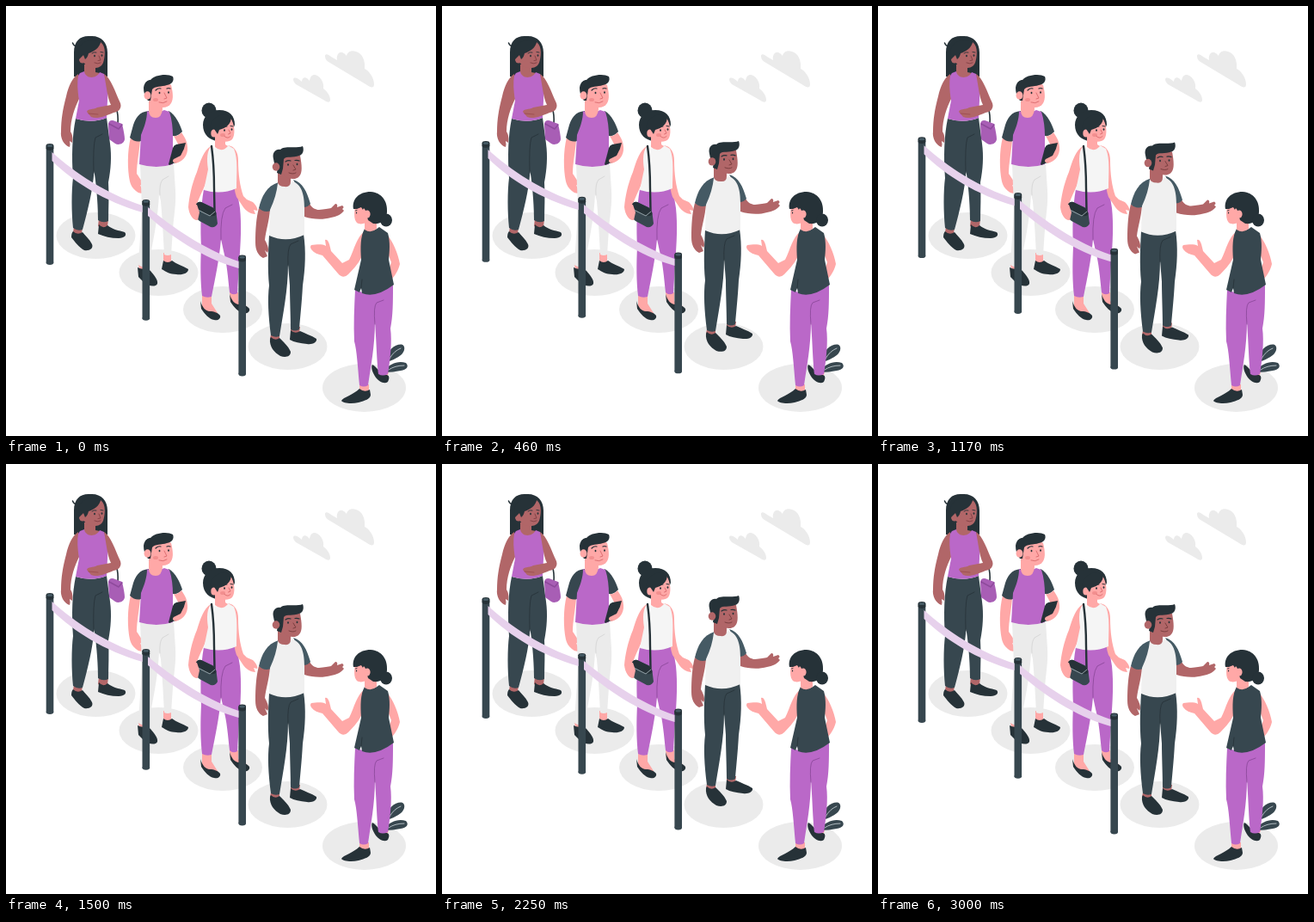
An HTML page with a canvas that plays this animation: 500 by 500 pixels, repeating every 3040 ms.

```html
<!DOCTYPE html>
<html>
<head>
<meta charset="utf-8">
<style>
html, body { margin: 0; width: 100%; height: 100%; overflow: hidden; background: #fff; }
canvas { display: block; width: 500px; height: 500px; }
</style>
</head>
<body>
<canvas id="stage"></canvas>
<script>
const canvas = document.getElementById('stage');
const ctx = canvas.getContext('2d');
const dpr = window.devicePixelRatio || 1;
canvas.width = canvas.height = 500 * dpr;

const INK = '#263238', SLATE = '#37474f', STEEL = '#455a64', PURPLE = '#ba68c8', PLUM = '#8e4a9c';
const PALE = '#ebebeb', SHIRT = '#f0f0f0', TOP = '#f5f5f5', ROPE = '#e7d1ec';
const ROSE = '#ffa8a7', BROWN = '#b16668', BLUSH = '#f28f8f';

const paths = {};
const path = d => paths[d] || (paths[d] = new Path2D(d));

function fill(color, ...shapes) {
  ctx.fillStyle = color;
  shapes.forEach(d => ctx.fill(path(d)));
}
function line(color, width, ...shapes) {
  ctx.strokeStyle = color;
  ctx.lineWidth = width;
  ctx.lineCap = ctx.lineJoin = 'round';
  shapes.forEach(d => ctx.stroke(path(d)));
}
function oval(color, x, y, rx, ry = rx, turn = 0) {
  ctx.fillStyle = color;
  ctx.beginPath();
  ctx.ellipse(x, y, rx, ry, turn, 0, 7);
  ctx.fill();
}
function eyes(x1, y1, x2, y2) {
  oval(INK, x1, y1, 0.9, 1.3);
  oval(INK, x2, y2, 0.9, 1.3);
}

function clouds() {
  fill(PALE,
    'M371 58C371 55 375 56 378 59L385 63C384 57 387 53 391 54Q394 55 396 58C397 53 402 51 407 53C414 55 418 63 417 73C423 76 428 84 428 91C428 96 424 95 420 92L375 65C372 63 371 61 371 58Z',
    'M334 85C335 82 340 84 344 88C344 84 347 82 350 84L353 87C354 80 358 79 362 81C367 84 370 90 369 96C373 99 377 104 377 109C377 113 373 112 369 109L337 91C335 89 334 87 334 85Z');
}

function shadows() {
  oval(PALE, 104.5, 267, 46, 27);
  oval(PALE, 177.5, 310, 46, 27);
  oval(PALE, 252, 353, 46, 27);
  oval(PALE, 327.5, 396, 46, 27);
  oval(PALE, 416.5, 444, 48.5, 28);
}

function longHairWoman() {
  fill(INK, 'M79 82V54C79 40 87 34 98 35C110 34 118 42 118 54V82Q98 88 79 82Z');
  line(INK, 1.5, 'M77.5 43Q79 47 82 46');
  fill(BROWN,
    'M84 79C77 84 73 92 70 105C66 120 64 132 64 146C63 153 67 162 74 164Q75 161 74 157L77 159C78 153 77 149 75 146C75 132 80 118 85 108Z',
    'M79 257H89L88 265Q83 268 78 263Z', 'M108 247H119L118 257Q113 260 107 256Z');
  fill(SLATE, 'M81 131Q100 137 117 130L121 160C123 175 122 190 119 205C120 220 119 236 119 250Q113 253 107 249C107 236 106 215 102.5 192C101 214 95 238 89 260Q83 262 78 258C76 240 76 215 78 200C76 175 77 150 81 131Z');
  line(INK, 0.8, 'M102 194Q101 162 104 153L112 149');
  fill(INK,
    'M78 262Q83 267 89 263C92 267 97 271 100 277C102 282 97 285 91 284C85 281 80 274 76 269Q76 264 78 262Z',
    'M108 254Q113 260 118 255C124 260 131 261 138 263C141 266 138 270 131 270C122 270 114 268 107 265Z');
  fill(BROWN, 'M91 68H104V77L109 78Q106 86 98 85Q90 84 89 78L91 77Z');
  fill(PURPLE, 'M86 78L91 76C92 84 104 86 109 77L114 79C118 86 119 100 118 110L117 130Q100 137 81 131L85 110Q82 92 84 81Z');
  line(INK, 1.6, 'M122 117C127 112 131 122 130 137');
  fill('#a85eb5', 'M119 138C119 133 123 132 127 134L135 137Q138 150 138 155C137 161 130 162 127 160L120 155Z');
  line(PLUM, 1.5, 'M120 137L131 143L135 138');
  fill(BROWN, 'M114 79C122 84 127 100 133 113C135 119 131 123 125 124C115 128 106 132 99 129L94 123C95 119 101 121 106 118L122 115C118 107 117 95 114 79Z');
  line('#9a4a4d', 0.8, 'M96 125L107 126');
  fill(BROWN, 'M88 58L96 54C103 52 108 48 110 42C117 47 115 60 113 66C110 73 102 73 96 71Q89 67 88 58Z');
  oval(BROWN, 89, 62, 4, 4.5);
  fill(INK, 'M84 53C86 41 96 38 110 41C109 49 102 53 96 55Q95 60 92 62L90 57L85 62Z');
  eyes(103, 58, 111.5, 57.5);
  line(INK, 0.9, 'M100 55Q102 53 105 54', 'M110 53.5L113 54');
  line('#813f43', 0.9, 'M108 58L110 63L107 63.5', 'M103 66Q107 68 110 66');
}

function tabletMan() {
  fill(ROSE, 'M145 153Q150 158 156 156C155 170 152 183 152 195C157 202 160 207 160 210L156 208L160 217Q155 219 151 215C147 212 145 208 144 204C141 190 141 168 145 153Z',
    'M183 287H192V298Q187 301 183 297Z', 'M154 299H165V308H155Z');
  fill(PALE, 'M156 183Q175 190 195 183L197 215C198 230 195 245 194 260L192 289Q188 291 184 289C183 270 182 250 180 227L178 218C177 245 171 275 165 303Q159 305 154 301C155 280 157 260 158 235Z');
  line('#d5d5d5', 0.9, 'M179 220Q178 207 182 202L189 198');
  fill(INK,
    'M153 304Q158 307 164 305L168 308C173 314 177 319 176 323C174 327 166 326 161 322L154 315Z',
    'M183 296Q188 300 193 296C198 300 205 302 212 306C212 311 205 313 198 312C191 312 186 309 181 306Z');
  fill(SLATE,
    'M166 122C155 123 150 130 147 142L144 153Q150 159 157 157L167 132Z',
    'M189 122C197 126 202 137 205 146Q200 152 194 151L187 130Z');
  fill(PURPLE, 'M164 122Q174 127 184 121L190 123C193 132 194 142 194 152V184Q175 190 155 184L157 150C161 140 164 132 164 122Z');
  fill(ROSE, 'M166 105H182V120Q181 130 174 130Q166 130 166 121Z');
  fill(ROSE, 'M168 96C172 92 190 89 192 92C194 100 195 108 192 113C189 118 183 119 176 117Q168 112 168 96Z');
  fill(INK, 'M160 95C161 88 165 86 168 86C172 80 188 78 194 82C196 87 193 91 187 92C181 94 173 93 170 97L168 110L165 110C161 105 160 100 160 95Z');
  oval(ROSE, 164.5, 104, 4, 4.7);
  oval(BLUSH, 174, 109, 3, 2);
  eyes(178.5, 101, 189, 100.5);
  line(INK, 1.2, 'M174 98Q177 95 180 96', 'M187 96Q189 95 191 96');
  line('#d9696c', 0.9, 'M184 101L187 107L184 108', 'M178 112Q183 114 187 111');
  fill(ROSE, 'M195 151Q200 152 204 147C208 153 213 160 210 170C208 178 201 183 196 183L194 176L203 166Z');
  fill(INK, 'M189 184L194 165Q195 162 198 161L209 159L204 176Q203 179 199 181L190 185Z');
  fill(ROSE, 'M211 163C212 175 205 182 195 182Q193 180 195 178L203 174L206 168Z');
}

function bunWoman() {
  oval(INK, 236, 121.5, 8.5, 9);
  fill(INK, 'M229 138C229 128 237 121 248 121C260 121 266 128 266 138L263 146L246 157C237 156 229 150 229 138Z');
  fill(ROSE,
    'M238 163C230 168 226 180 222 193C216 207 213 222 212 234C213 243 218 249 222 249L226 244L222 230C228 215 235 202 238 190Z',
    'M228 336H239V346L246 357L238 359L228 350Z', 'M260 333H270V343L280 349L272 352L261 343Z');
  fill(PURPLE, 'M230 213Q250 220 268 211L272 235C274 255 273 275 271 300L269 334Q264 337 260 333C258 315 257 300 253 285L250 271C248 295 243 318 239 338Q233 340 228 337C226 320 226 300 227 280C226 260 226 235 230 213Z');
  line(PLUM, 0.9, 'M250 272Q249 243 255 235L263 231');
  fill(INK,
    'M226 343C228 350 232 355 237 355C242 355 247 357 249 360C250 364 246 366 242 365C236 364 231 358 227 352Z',
    'M260 335C262 342 266 347 271 347C276 347 281 349 283 352C284 356 280 358 276 357C270 356 265 350 261 344Z');
  fill(ROSE, 'M258 162C266 163 270 170 270 180C270 195 272 210 276 221L280 225L287 228C292 233 293 237 292 238L288 237L290 242C284 242 279 238 276 234L268 222C264 210 263 190 262 180Z');
  fill(TOP, 'M238 164Q248 168 258 162L265 166C270 178 268 195 268 212Q250 220 230 214L235 190C233 178 234 168 238 164Z');
  fill(ROSE, 'M243 150H255V161L258 163Q251 171 243 164Z');
  fill(ROSE, 'M243 143C252 141 259 137 261 130C266 137 267 150 263 155C259 159 251 158 246 155Z');
  oval(ROSE, 242, 148, 3.7, 4.5);
  fill(INK, 'M237 141C241 127 253 123 262 129C262 137 256 142 248 144L246 149L242 143Z');
  oval(BLUSH, 252, 150, 3, 2);
  eyes(254, 144.5, 262.5, 143.5);
  line(INK, 1, 'M252 141Q254 139.5 257 140', 'M261 139.5L264 140');
  line('#d9696c', 0.9, 'M259 144L261 148L258.5 149', 'M254 151.5Q258 155 261 151.5');
  line(INK, 2.4, 'M239 163Q242 185 242 212L242.5 237');
  fill(SLATE, 'M221 231Q223 227 227 228L240 234Q245 237 245 245L246 253Q244 258 238 257L225 250Q221 247 222 242Z');
  fill(INK, 'M221 231Q223 227 227 228L241 235Q245 238 244 243Q239 246 233 242L222 235Z');
  line('#b0bec5', 0.8, 'M223 237L237 244L243 239');
  fill(ROSE, 'M213 232L222 231L225 240L223 249Q217 248 214 241Z');
}

function barrier() {
  [[51, 162.5], [162.8, 227.3], [274.7, 292]].forEach(([x, y]) => {
    ctx.fillStyle = SLATE;
    ctx.fillRect(x - 4.3, y, 8.6, 136);
    oval(SLATE, x, y + 136, 4.3, 2.4);
    oval(INK, x, y + 3, 4.3, 2.4);
    ctx.fillRect(x - 4.3, y, 8.6, 3);
    oval(INK, x, y, 4.3, 2.4);
    oval(STEEL, x, y, 3.2, 1.5);
  });
  fill(ROPE,
    'M53.5 170C80 194 116 218 158.6 232V240C114 227 79 205 53.5 180Z',
    'M165 234C192 256 230 283 270.5 297V305C228 293 191 267 165 244Z');
}

function frontMan() {
  fill(BROWN,
    'M294 235Q300 240 307 237C306 250 302 262 301 272C305 279 306 284 304 287L301 284L304 291L299 293C293 290 290 284 290 275C290 260 291 246 294 235Z',
    'M346 233L353 230C356 235 360 237 364 237C370 236 375 236 378 235L383 230Q386 230 385 234L391 232Q394 234 391 236L393 238C389 243 384 245 378 246C368 249 356 248 347 245Z',
    'M308 382H318V388Q313 391 307 387Z', 'M331 373H342L341 380Q336 382 331 378Z');
  fill(SLATE, 'M306 266Q326 275 346 265C349 285 348 305 345 325C344 345 342 362 341 376Q336 379 331 376C331 360 330 340 330 325L328 300C328 330 322 358 318 384Q313 386 308 383C305 360 304 340 306 325C304 305 305 285 306 266Z');
  line(INK, 0.8, 'M328 302Q327 282 331 277L340 273');
  fill(INK,
    'M308 385Q313 390 318 386C322 390 328 395 331 402C331 408 325 409 319 407C312 403 306 396 307 387Z',
    'M331 377Q336 382 342 378C348 381 355 383 361 387C362 391 356 394 350 393C342 392 335 391 330 388Z');
  fill(STEEL,
    'M317 205C303 209 297 222 294 235Q300 241 308 238C312 228 316 216 317 205Z',
    'M334 202C345 205 350 216 354 230Q351 234 346 234L340 213Z');
  fill(SHIRT, 'M316 206Q323 211 333 204C344 207 347 220 347 235V266Q326 276 306 267L307 237C312 226 315 216 316 206Z');
  fill(BROWN, 'M316 190H331V204Q331 211 324 210Q317 210 316 205Z');
  fill(BROWN, 'M320 178C328 173 338 173 342 174C344 185 345 194 341 198C337 203 328 201 324 198Q320 192 320 178Z');
  fill(INK, 'M311 178C309 170 314 166 319 167C323 162 338 166 345 163C347 168 345 173 341 174C334 177 326 174 323 178L322 189L320 196L315 194L316 187L312 183Z');
  oval(BROWN, 314, 187, 4.3, 4.7);
  eyes(328, 184.5, 338.5, 184);
  line(INK, 1.2, 'M325 181Q328 179 331 180', 'M336 179.5Q339 179 341 180');
  line('#743a3c', 0.9, 'M334 185L337 190L334 191', 'M329 194Q334 196 337 194');
}

function plant() {
  fill(SLATE,
    'M440 413C444 400 452 393 460 393.5C465 395 464 402 459 406Q453 411 440 415Z',
    'M440 424C446 416 456 412 465 415C469 419 466 423 459 424Q450 426 440 426Z');
  line('#cfd8dc', 0.8, 'M446 410Q451 401 459 398', 'M445 423Q452 418 463 418');
}

function hostess() {
  fill(ROSE,
    'M442 264C450 274 456 288 458 300C456 308 452 314 448 318L445 307L448 298L443 285Z',
    'M411 440H422V449Q416 452 411 447Z', 'M433 426H445L442 434Q437 435 433 429Z');
  fill(INK,
    'M411 445Q417 450 423 446L424 452C424 457 417 459 410 461C402 463 392 462 390 459C392 455 404 452 411 445Z',
    'M426 417C424 420 426 426 430 432C434 437 440 440 444 437C446 433 446 430 443 429C436 430 432 420 426 417Z');
  fill(PURPLE, 'M406 330Q430 340 450 324C450 345 450 360 447 375C449 390 447 410 444 428Q438 431 433 428C431 410 431 395 429 367C429 395 424 420 421 441Q416 444 411 441C409 420 408 400 405 390C404 370 405 350 406 330Z');
  line(PLUM, 0.9, 'M429 370Q427 349 431 345L439 342');
  fill(ROSE, 'M417 262C408 268 405 283 399 295L391 299L378 285L376 277Q374 271 371 272L372 279C366 276 360 278 355 278Q353 280 355 283C358 287 363 289 368 290L386 311Q392 318 398 312C405 305 412 297 415 288Z');
  fill(SLATE, 'M417 259Q426 264 434 257L444 264C447 275 446 285 445 295L451 324Q430 340 414 334L413 328L411 333L405 330L413 295C412 280 412 268 417 259Z');
  line(INK, 0.8, 'M413 328L414 318');
  fill(ROSE, 'M417 247H431V259Q424 265 417 260Z');
  fill(ROSE, 'M406 232C405 240 404 248 408 252C412 255 419 253 422 249L423 234Z');
  fill(INK, 'M404 236C402 225 410 216 424 216C437 217 444 227 443 240C442 249 436 254 427 253L421 249L418 238Q416 233 415 237L413 234L408 236Z');
  oval(INK, 442, 249, 7, 7.5);
  oval(ROSE, 420, 242, 3.6, 4.6);
  line(INK, 0.9, 'M406.5 238L408 237.5');
  oval(INK, 407.5, 240.5, 0.7, 1.1);
}

// Straight up-and-down drift of 10px over one period
const drift = (t, period) => {
  const p = (t % period) / period;
  return -10 * (1 - Math.abs(1 - 2 * p));
};

function shifted(dy, draw) {
  ctx.save();
  ctx.translate(0, dy);
  draw();
  ctx.restore();
}

const start = performance.now();
function render(now) {
  const loop = Math.max(0, now - start) % 3040;
  const t = Math.floor(loop * 0.024 + 0.1) / 0.024; // 24 steps per second
  ctx.setTransform(dpr, 0, 0, dpr, 0, 0);
  ctx.fillStyle = '#fff';
  ctx.fillRect(0, 0, 500, 500);
  clouds();
  shadows();
  longHairWoman();
  tabletMan();
  bunWoman();
  shifted(drift(t, 3000), barrier);
  shifted(drift(t, 1500), frontMan);
  plant();
  hostess();
  requestAnimationFrame(render);
}
render(start);
</script>
</body>
</html>
```
